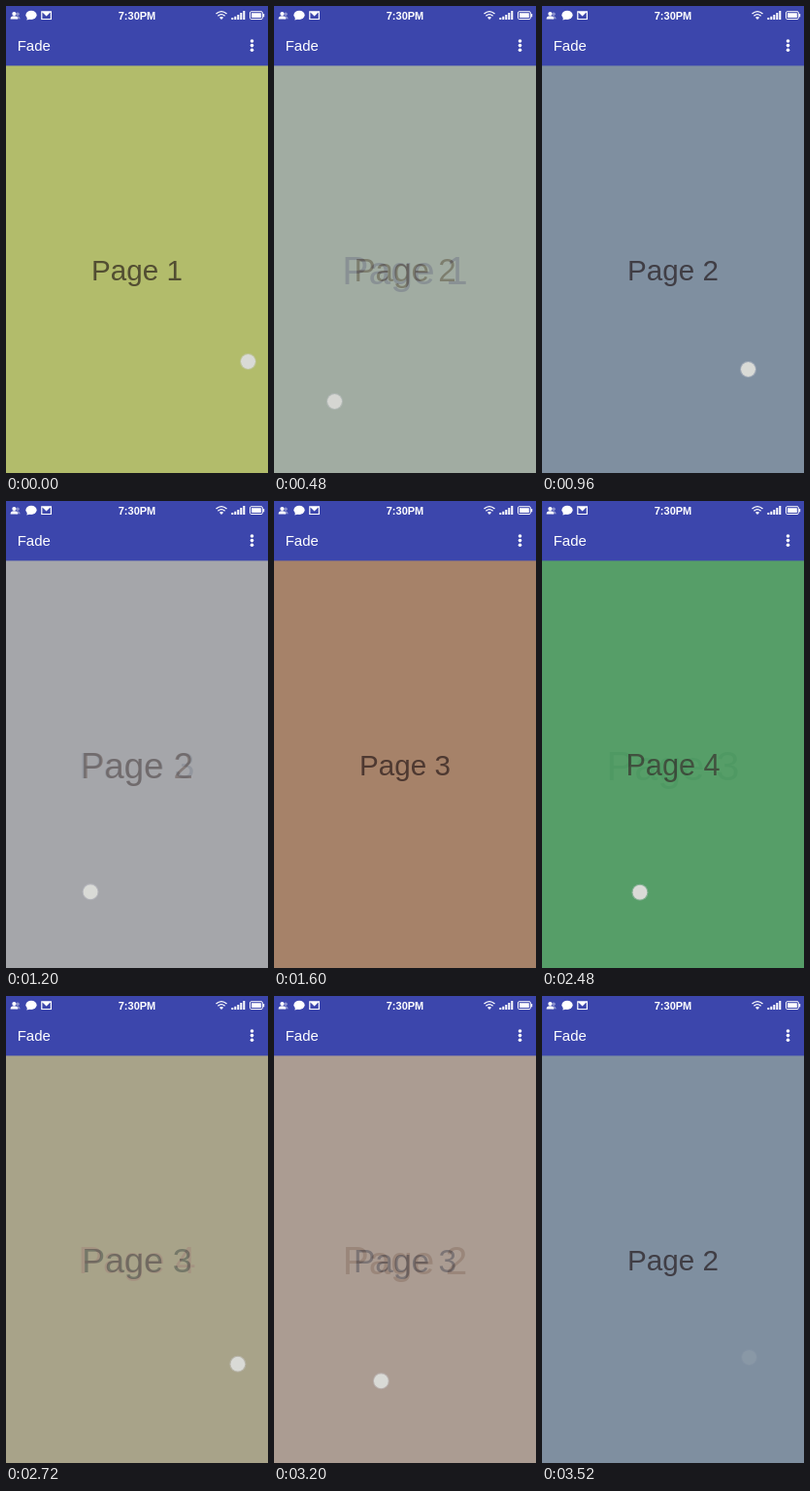
Animation, 270 px wide and 480 px high, one loop 3600 ms. Source, as an HTML page:

```html
<!DOCTYPE html>
<html lang="en">
<head>
<meta charset="utf-8">
<title>Fade</title>
<style>
  html, body { margin: 0; width: 100%; height: 100%; overflow: hidden; background: #fafafa; }
  body { position: relative; font-family: "Liberation Sans", Arial, sans-serif; }
  #bar { position: absolute; left: 0; top: 0; }
  #pager { position: absolute; left: 0; top: 61px; width: 270px; height: 419px; overflow: hidden; background: #fafafa; }
  .page {
    position: absolute; inset: 0; opacity: 0;
    font-size: 29.6px; line-height: 422px; text-align: center;
    color: rgba(30, 18, 20, .65);
  }
  #touch {
    position: absolute; left: -9px; top: -9px; width: 15px; height: 15px;
    border: 1.5px solid rgba(205, 205, 215, .4); border-radius: 50%;
    background: #d9dad6; background-clip: padding-box; opacity: 0;
  }
</style>
</head>
<body>
<div id="pager"></div>
<svg id="bar" width="270" height="62" viewBox="0 0 270 62" fill="#fff">
  <rect width="270" height="61" fill="#3c46ac"/>
  <rect y="61" width="270" height="1" fill="#3c46ac" opacity=".4"/>
  <g opacity=".4">
    <circle cx="12" cy="8.3" r="1.8"/>
    <path d="M10 13.2q0-3 2-3t2.8 3z"/>
  </g>
  <circle cx="8.4" cy="8" r="2.1"/>
  <path d="M4.6 13.5q0-3.2 3.8-3.2t3.8 3.2z"/>
  <ellipse cx="26" cy="9.3" rx="5.6" ry="4.6"/>
  <path d="M22 11.5l-.6 3 4-1.3z"/>
  <path d="M36.8 5.9h9.6v7.6h-9.6z" fill="none" stroke="#fff" stroke-width="1.2"/>
  <path d="M37 6h9.2l-4.6 4.4z"/>
  <text x="135" y="14" font-size="11" font-weight="bold" text-anchor="middle">7:30PM</text>
  <g fill="none" stroke="#fff" stroke-width="1.3">
    <path d="M216.5 8q5.5-4.8 11 0M218.4 10.2q3.6-3.1 7.2 0"/>
    <rect x="251.5" y="5.7" width="12.8" height="7.8" rx="1.2" stroke-width="1"/>
  </g>
  <path d="M219.9 11.8q2.1-1.6 4.2 0l-2.1 2.3z"/>
  <path d="M232.3 12h2v2h-2zM235.3 10.7h2v3.3h-2zM238.3 9h2v5h-2zM241.3 7h2v7h-2zM244.3 5h2v9h-2z"/>
  <path d="M253 7.2h9.8v4.8h-9.8zM264.8 8h1.4v3.2h-1.4z"/>
  <text x="11.7" y="46.2" font-size="15">Fade</text>
  <circle cx="253.5" cy="36" r="1.8"/>
  <circle cx="253.5" cy="40.6" r="1.8"/>
  <circle cx="253.5" cy="45.2" r="1.8"/>
</svg>
<div id="touch"></div>
<script>
const LOOP = 3600, WIDTH = 270, SETTLE = 240, FADE = 160;
const COLORS = ['#b2bc6b', '#7f8fa0', '#a68269', '#449b5e'];

// page, direction, touch down, drag start, release, start point, end point
const SWIPES = [
  [0, 1, -100, 90, 470, 250, 366, 63, 407],
  [1, 1, 860, 960, 1340, 213, 374, 35, 414],
  [2, 1, 1640, 1700, 2040, 212, 374, 33, 417],
  [3, -1, 2330, 2400, 2760, 82, 406, 244, 378],
  [2, -1, 3000, 3060, 3380, 40, 413, 214, 372]
].map(([page, dir, down, start, up, x0, y0, x1, y1]) =>
  ({ page, dir, down, start, up, x0, y0, x1, y1 }));

const clamp = v => Math.max(0, Math.min(1, v));
const easeDrag = u => (1 - Math.cos(Math.PI * u)) / 2;
const easeSettle = u => 1 - (1 - u) ** 5;

const touch = document.getElementById('touch');
const pages = COLORS.map((color, i) => {
  const el = document.createElement('div');
  el.className = 'page';
  el.style.background = color;
  el.textContent = `Page ${i + 1}`;
  // earlier pages lie on top
  document.getElementById('pager').prepend(el);
  return el;
});

function draw(t) {
  const s = SWIPES.findLast(w => t >= w.down);
  const k = easeDrag(clamp((t - s.start) / (s.up - s.start)));
  const x = s.x0 + (s.x1 - s.x0) * k;
  const y = s.y0 + (s.y1 - s.y0) * k;

  const dragged = Math.abs(x - s.x0) / WIDTH;
  const settled = easeSettle(clamp((t - s.up) / SETTLE));
  const scroll = s.page + s.dir * (dragged + (1 - dragged) * settled);

  pages.forEach((el, i) => {
    const off = Math.min(1, Math.abs(i - scroll));
    el.style.opacity = 1 - off;
    el.style.transform = `scale(${1 + off / 2})`;
  });

  touch.style.transform = `translate(${x}px, ${y}px)`;
  touch.style.opacity = clamp((t - s.down) / 60) * clamp(1 - (t - s.up) / FADE);
}

const begin = performance.now();
function tick() {
  draw((performance.now() - begin) % LOOP);
  requestAnimationFrame(tick);
}
tick();
</script>
</body>
</html>
```
